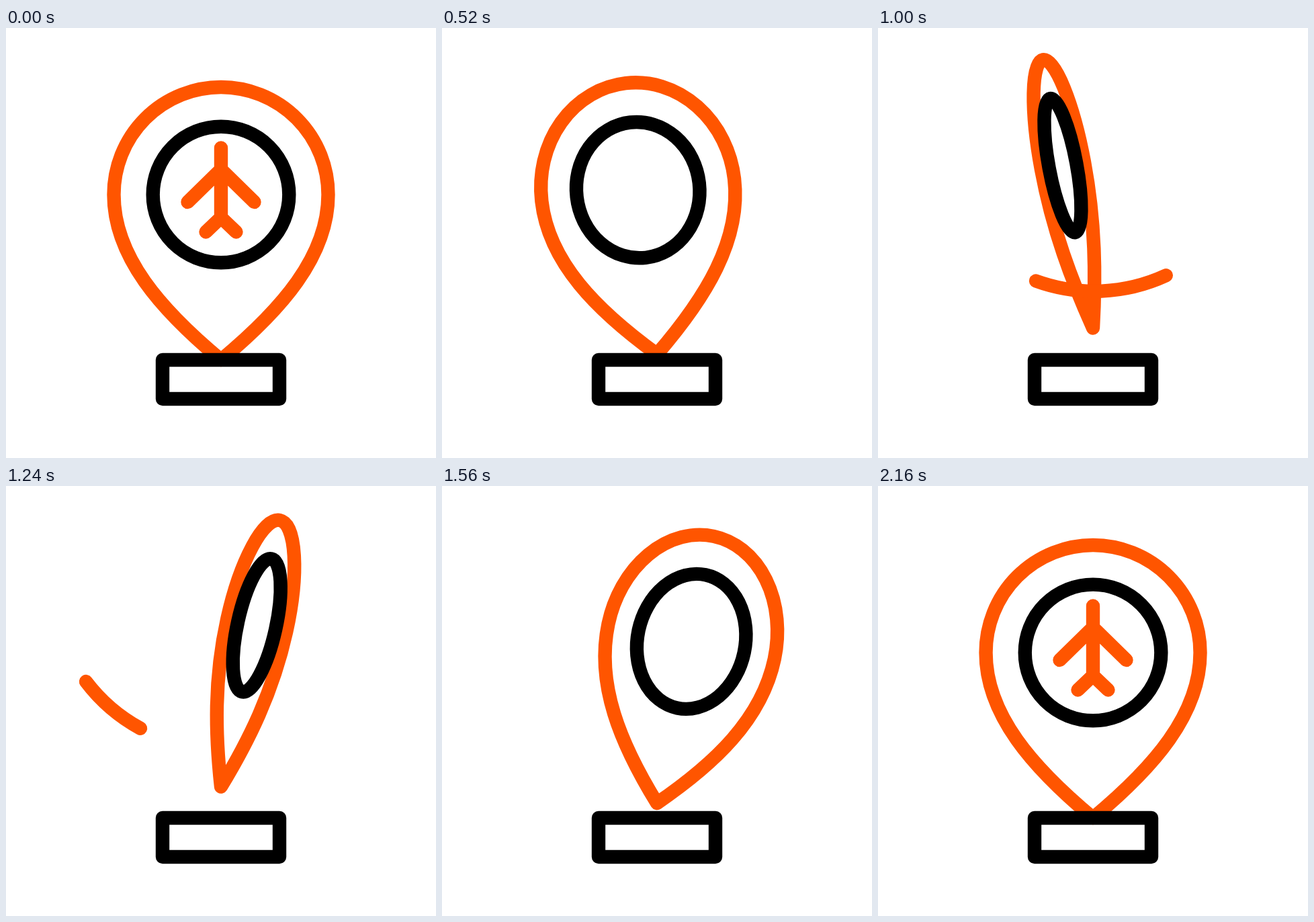
Animation, 640 px wide and 640 px high, one loop 2.24 s. Source, as an HTML page with a canvas:

```html
<!DOCTYPE html>
<html lang="en">
<head>
<meta charset="utf-8">
<title>Airport pin</title>
<style>
  html, body { margin: 0; width: 100%; height: 100%; overflow: hidden; background: #fff; }
  canvas { display: block; width: 100%; height: 100%; }
</style>
</head>
<body>
<canvas id="stage" width="640" height="640"></canvas>
<script>
const ctx = document.getElementById('stage').getContext('2d');
const ORANGE = '#ff5500', BLACK = '#000';
const LOOP = 2240, STEP = 40, SPIN = 2200, HALF = SPIN / 2;
const RAD = Math.PI / 180;

// [time, value] keys of the first half turn; the second half mirrors it
const TURN = [[0, 0], [180, 3.4], [360, 12.7], [520, 25.2], [640, 37.6], [760, 51.1], [960, 73.6], [1100, 90], [1240, 106.4]];
const LEAN = [[0, 0], [200, .2], [360, 1.2], [520, 6.6], [600, 10.4], [640, 12], [760, 12.95], [840, 13.1], [960, 12.5], [1100, 0], [1240, -12.5]];
const LIFT = [[0, 0], [200, .5], [360, 2.4], [520, 8.5], [560, 11.4], [640, 22], [760, 37], [960, 46.5], [1100, 49], [1240, 46.5]];

const clamp = u => Math.max(0, Math.min(1, u));

function ease(t, from, to) {
  const u = clamp((t - from) / (to - from));
  return u * u * (3 - 2 * u);
}

function slope(keys, i) {
  if (i < 1 || i > keys.length - 2) return 0;
  const [a, b, c] = [keys[i - 1], keys[i], keys[i + 1]];
  const left = (b[1] - a[1]) / (b[0] - a[0]);
  const right = (c[1] - b[1]) / (c[0] - b[0]);
  return left * right > 0 ? 2 * left * right / (left + right) : 0;
}

// Monotone cubic interpolation
function track(keys, t) {
  let i = 0;
  while (i < keys.length - 2 && t > keys[i + 1][0]) i++;
  const [t0, a] = keys[i], [t1, b] = keys[i + 1];
  const h = t1 - t0, u = clamp((t - t0) / h), v = 1 - u;
  return a * v * v * (1 + 2 * u) + b * u * u * (3 - 2 * u)
    + h * u * v * (slope(keys, i) * v - slope(keys, i + 1) * u);
}

function stroke(color, path) {
  ctx.strokeStyle = color;
  ctx.stroke(path);
}

function shape(build) {
  const path = new Path2D();
  build(path);
  return path;
}

// Outlines relative to the tip of the pin
const pin = shape(p => {
  p.moveTo(0, 0);
  p.bezierCurveTo(-90, -75, -159.5, -154, -159.5, -246);
  p.ellipse(0, -246, 159.5, 160, 0, Math.PI, 2 * Math.PI);
  p.bezierCurveTo(159.5, -154, 90, -75, 0, 0);
  p.closePath();
});
const ring = shape(p => p.arc(0, -246, 101.3, 0, 2 * Math.PI));
const base = shape(p => p.rect(233, 494, 174, 58));
const plane = shape(p => {
  p.moveTo(320, 178.5);
  p.lineTo(320, 282);
  p.moveTo(270.5, 259);
  p.lineTo(320, 210.5);
  p.lineTo(369.5, 259);
  p.moveTo(297.5, 303.5);
  p.lineTo(320, 282);
  p.lineTo(342.5, 303.5);
});

function posed(path, matrix) {
  return shape(p => p.addPath(path, matrix));
}

function planeShift(t) {
  return t < HALF ? -185 * ease(t, 0, 560) : 177 * (1 - ease(t, 1460, 2160));
}

function drawTrail(t) {
  const head = ease(t, 700, 1180), tail = ease(t, 780, 1450);
  if (head <= tail) return;
  const angle = k => (39 + 103.8 * k) * RAD;
  stroke(ORANGE, shape(p => p.arc(322, 137, 254.8, angle(tail), angle(head))));
}

function draw(t) {
  const late = t > HALF;
  const m = Math.max(0, late ? SPIN - t : t);
  const width = Math.cos(track(TURN, m) * RAD);
  const lean = track(LEAN, m) * (late ? 1 : -1);
  const pose = new DOMMatrix()
    .translate(320, 494 - track(LIFT, m))
    .rotate(lean)
    .scale(Math.max(width, .001), 1);
  const hole = posed(ring, pose);

  ctx.fillStyle = '#fff';
  ctx.fillRect(0, 0, 640, 640);
  ctx.lineWidth = 20.4;
  ctx.lineCap = ctx.lineJoin = 'round';

  stroke(ORANGE, posed(pin, pose));

  ctx.save();
  ctx.clip(hole);
  ctx.translate(0, planeShift(t));
  stroke(ORANGE, plane);
  ctx.restore();

  stroke(BLACK, hole);
  drawTrail(t);
  stroke(BLACK, base);
}

const start = performance.now();
function tick() {
  const t = (performance.now() - start) % LOOP;
  draw(Math.floor(t / STEP) * STEP);
  requestAnimationFrame(tick);
}
tick();
</script>
</body>
</html>
```
